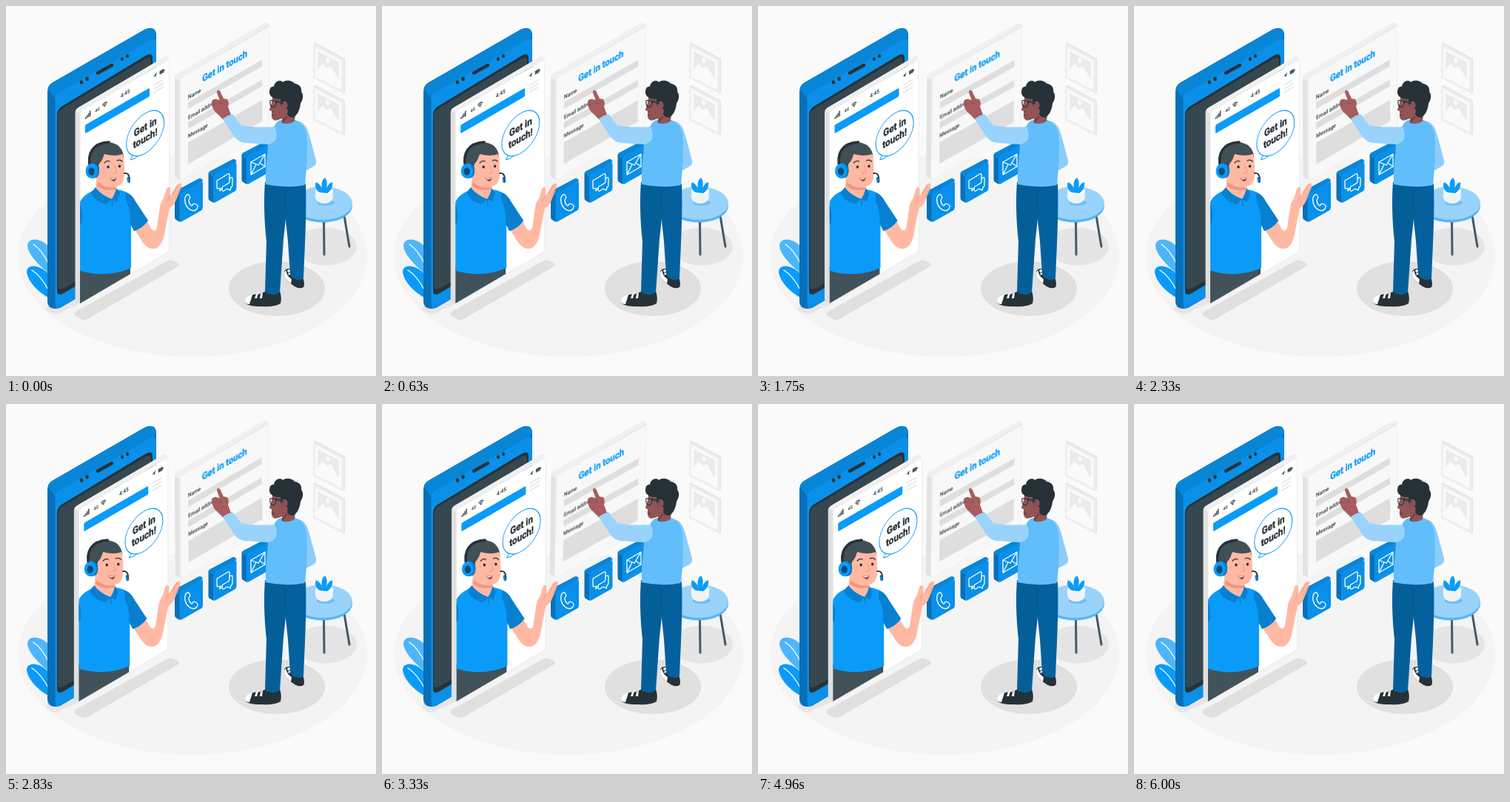
Recreate the animation shown at these times as an HTML page. Size 500 by 500 pixels, loop 6040 ms.

```html
<!DOCTYPE html>
<html lang="en">
<head>
<meta charset="utf-8">
<title>Get in touch</title>
<style>
  html, body { margin: 0; width: 100%; height: 100%; overflow: hidden; background: #fafafa; }
  svg { display: block; width: 100%; height: 100%; }
  text { font-family: Roboto, "Liberation Sans", sans-serif; font-weight: 500; fill: #263238; }
  .bold { font-weight: 700; stroke: #263238; stroke-width: .35; }
  .bold.blue { stroke: #0a9bf8; }
  .mid { text-anchor: middle; }
  .blue { fill: #0a9bf8; }
  .front { fill: #0a90e9; }
  .edge { fill: #0985d6; }
  .deep { fill: #0880cf; }
  .side { fill: #0870b8; }
  .light { fill: #99d3fc; }
  .ink { fill: #263238; }
  .slate { fill: #37474f; }
  .skin { fill: #ffb9a3; }
  .brown { fill: #8f5555; }
  .line { fill: none; stroke-linecap: round; stroke-linejoin: round; }
  .white { stroke: #fff; stroke-width: 1.3; }
  .dark { stroke: #263238; }

  #screen { animation: shake 6040ms linear infinite; }
  #form { animation: sway 6040ms linear infinite; transform-origin: 291.5px 129px; }

  /* Both cycles last 6 s, followed by a 40 ms rest. */
  @keyframes shake {
    0%, 99.338%, 100% { transform: translateX(0); }
    9.934%, 89.404% { transform: translateX(-1px); }
    19.868%, 79.47% { transform: translateX(2px); }
    29.801%, 49.669%, 69.536% { transform: translateX(-4px); }
    39.735%, 59.603% { transform: translateX(4px); }
  }
  @keyframes sway {
    0%, 99.338%, 100% { transform: rotate(0deg); }
    6.209%, 31.043%, 55.878%, 80.712% { transform: rotate(1deg); }
    18.626%, 43.46%, 68.295%, 93.129% { transform: rotate(-1deg); }
  }
</style>
</head>
<body>
<svg viewBox="0 0 500 500" xmlns="http://www.w3.org/2000/svg">
  <defs>
    <clipPath id="panel"><path d="M100 0H300V285L100 402Z"/></clipPath>
    <g id="picture">
      <path d="M0 0L3 -1.500L43 20V65.500L41 67L0 46Z" fill="#e6e6e6"/>
      <path d="M0 0L41 21.500V66.500L0 45.500Z" fill="#f0f0f0"/>
      <path d="M3 4.500L38 23V62L3 44Z" fill="#fafafa"/>
      <path d="M6 10L35 25V56L6 41Z" fill="#ebebeb"/>
      <path d="M6 41V35L13 26L18 33L24 30L35 49V56Z" fill="#fafafa"/>
      <ellipse cx="20" cy="23" rx="2.500" ry="3.200" fill="#fafafa"/>
    </g>
    <g id="key">
      <path class="side" d="M0 12Q0 9.500 2 8.500L32 -7Q36 -8.500 38 -5L7 17V51L2 48Q0 47 0 44Z"/>
      <path class="edge" d="M0 12Q0 9.500 2 8.500L33 -8Q36 -9 38 -5L8 13Q6 14 6 16Z"/>
      <path class="front" d="M6.500 16Q6.500 13.500 9 12L35 -3Q38 -5 38 -1V31Q38 34 35.500 35.500L10 50Q6.500 52 6.500 48Z"/>
    </g>
  </defs>

  <rect width="500" height="500" fill="#fafafa"/>
  <ellipse cx="252" cy="338" rx="236" ry="136" fill="#f4f4f4"/>

  <use href="#picture" x="415" y="51"/>
  <use href="#picture" x="415" y="108"/>

  <!-- Ground shadows -->
  <g fill="#e0e0e0">
    <path d="M55 411Q53 408 57 406L100 385V402L72 415Q66 418 62 415Z" fill="#e6e6e6"/>
    <path d="M94 419Q90 415 96 412L217 345Q222 342 226 344L232 347Q236 350 231 353L112 422Q106 426 101 423Z"/>
    <ellipse cx="366" cy="382" rx="65" ry="37"/>
    <ellipse cx="432" cy="325" rx="42" ry="25.500" fill="#e5e5e5"/>
  </g>

  <!-- Leaves -->
  <path d="M62 366C52 356 30 339 29 324C30 311 50 313 62 330Z" fill="#4fb5fa"/>
  <path class="blue" d="M62 396C46 390 28 372 28 358C30 347 50 350 62 368Z"/>
  <path class="line white" d="M37 322Q48 329 58 349M35 357Q47 364 58 385" stroke-width="1"/>

  <!-- Phone body -->
  <path class="side" d="M56 116Q56 108 62 104L187 32Q203 25 203 40V332L73 408Q56 412 56 399Z"/>
  <path class="edge" d="M57 112Q57 107 62 104L187 32Q200 26 203 38L196 50L72 122L66 125Z"/>
  <path class="front" d="M66.500 127Q66.500 120 72 117L195 46Q203 42 203 49V332L74 407Q66.500 411 66.500 402Z"/>
  <path class="ink" d="M69 148Q69 140 75 136L189 67Q198 62 198 71V318L78 388Q69 393 69 385Z"/>
  <path class="slate" d="M70 150Q70 142 76 138.500L188 71.500Q196 67 196 75V314L79 381Q70 386 70 379Z"/>
  <g class="ink">
    <path class="line dark" d="M124 90.500L143 80" stroke-width="4.500"/>
    <ellipse cx="102" cy="103" rx="2.200" ry="2.700"/>
    <ellipse cx="109.500" cy="98.500" rx="2.200" ry="2.700"/>
    <ellipse cx="157" cy="71.500" rx="2" ry="2.500"/>
    <ellipse cx="164" cy="67.500" rx="2" ry="2.500"/>
  </g>

  <!-- Contact form -->
  <g id="form">
    <path d="M228 97Q228 94 231 92L348 24Q351 22 354 24L356 27L236 101V235L230 232Q228 231 228 228Z" fill="#e3e3e3"/>
    <path d="M228 97Q228 94 231 92L348 24Q351 22 355 26L236 97L234.500 101Z" fill="#f0f0f0"/>
    <path d="M235 101Q235 98 238 96L352 29.500Q355.500 28 355.500 31V164Q355 167 353 168.500L239 234Q235 236 235 232Z" fill="#f8f8f8" stroke="#ececec" stroke-width=".7"/>
    <g transform="matrix(1 -.577 0 1 235 98)" fill="#dedede">
      <rect x="11" y="38.500" width="100" height="9"/>
      <rect x="11" y="65.500" width="100" height="9"/>
      <rect x="11" y="93" width="100" height="29"/>
    </g>
    <g transform="matrix(.866 -.5 0 1 235 98)" font-size="7.500">
      <text class="bold blue mid" x="70" y="22.500" font-size="13">Get in touch</text>
      <text x="12.800" y="34.500">Name</text>
      <text x="12.800" y="62">Email address</text>
      <text x="12.800" y="87">Message</text>
    </g>
  </g>

  <!-- Contact buttons -->
  <use href="#key" x="228" y="241"/>
  <use href="#key" x="273.500" y="215"/>
  <use href="#key" x="318.500" y="190"/>
  <g class="line white">
    <path d="M242 259C241 263 242 269 246 273C250 277 255 278 258 274C260 271 259 269 257 268L254 267L251 270C248 268 247 265 247 262L249 259L247 255C245 254 243 256 242 259Z"/>
    <path d="M285 236L300 227Q302 226 302 228V237Q302 239 300 240L293 244L289 250V246L286 247Q285 247 285 245Z"/>
    <path d="M302 233L304 232Q306 231 306 233V242Q306 244 304 245L303 249L299 247L294 250Q292 251 292 247V246"/>
    <path d="M331 211L350 200V217L331 228ZM331 211L341 215L350 200M331 228L338 214M350 217L343 212"/>
  </g>

  <!-- Side table -->
  <g>
    <path class="line" d="M429.500 288L430 336M457 283L464 325" stroke="#455a64" stroke-width="3"/>
    <path d="M388 267V270A40 22.500 0 0 0 468 270V267Z" fill="#55b5fa"/>
    <ellipse class="light" cx="428" cy="266.500" rx="40" ry="22.500"/>
    <ellipse cx="432" cy="266" rx="12" ry="4" fill="#6dc0fb"/>
    <path d="M418 250V258C419 270 441 270 442 258V250Z" fill="#f3f3f3"/>
    <ellipse cx="430" cy="250" rx="12" ry="4.200" fill="#fff"/>
    <path class="blue" d="M424 252C418 249 417 242 419 238C425 241 427 246 428 249C425 241 427 235 431 232C435 237 434 244 432 249C434 243 437 239 441 238C442 245 438 251 434 253Z"/>
  </g>

  <!-- Visitor -->
  <g>
    <path class="ink" d="M376 359C377 355 382 354 386 356L402 369Q404 377 402 380Q397 383 390 379C384 375 376 368 376 359Z"/>
    <path d="M376 360C376 366 380 371 385 375L386 369Q380 366 378 357ZM380 357L386 355L388 361L382 364Z" fill="#fff"/>
    <path class="line dark" d="M381 361L387 358M383 364L389 361" stroke-width="1"/>
    <path class="ink" d="M323 400C324 392 335 389 343 389L352 385H370Q373 394 371 402Q364 407 345 406Q325 406 323 400Z"/>
    <path d="M323 400C323 394 328 391 333 390Q331 397 329 403Q324 403 323 400ZM338 389L341 388L339 395H336ZM344 389L347 387L346 395H343Z" fill="#fff"/>

    <path d="M375 238L405 240C406 270 405 299 404 321L402 368Q392 374 384 363L381 318L375 262Z" fill="#04619e"/>
    <path d="M350 238H382C380 264 378 290 375 315L370 387Q361 393 350 387L352 318C349 290 348 263 350 238Z" fill="#045f99"/>
    <path class="line" d="M376 248L378 276" stroke="#034f80" stroke-width="1"/>

    <path d="M391 155C403 156 407 163 411 179L419 209Q420 214 415 217L401 225L400 211L407 207L399 187Z" fill="#8accfc"/>
    <path d="M371 154C367 155 365 158 362 163L354 187C353 206 350 223 351 241Q378 247 404 242C406 222 408 198 406 174C404 162 398 156 388 153Z" fill="#62bdfb"/>
    <path class="light" d="M363 163C347 164 330 164 318 161L306 146Q297 148 293 153L309 177Q314 184 324 185L354 187Q361 186 365 180Q367 171 363 163Z"/>

    <path d="M293 153L286 146Q279 141 278 132C277 127 281 125 285 126L289 128L285 117Q285 113 288 114Q290 115 291 119L294 125L299 126Q302 130 300 136L304 147Q298 148 293 153Z" fill="#a65d5f"/>
    <path class="line" d="M288 127L291 134M280 133L285 132" stroke="#874b4e" stroke-width=".9"/>

    <g transform="translate(1 .7)">
      <path class="brown" d="M360 117L358 130L355 139Q355 141 358 141L358 149Q359 154 364 154L373 151L371 157Q380 161 389 155L391 137L385 117Z"/>
      <path d="M372 152Q377 150 380 145Q379 153 372 157Z" fill="#7b4347"/>
      <path class="ink" d="M355 116C355 110 357 108 361 108C362 101 369 98 373 102C379 98 387 101 389 104C396 105 399 110 398 115C402 120 400 127 397 131C396 142 391 148 387 150Q380 150 379 145L380 139L374 138Q369 134 370 125C362 126 355 122 355 116Z"/>
      <ellipse class="brown" cx="375.500" cy="133.500" rx="4" ry="5.500"/>
      <path class="line" d="M374 131Q378 132 375 137" stroke="#7b4347" stroke-width=".8"/>
      <path class="line dark" d="M359 127L369 128M356 127Q355 134 359 136Q364 135 364 130Q363 126 356 127M364 129L374 131" stroke-width="1.100"/>
      <path class="line" d="M358 147L362 147" stroke="#6c3438" stroke-width="1"/>
    </g>
  </g>

  <!-- Phone screen with the agent -->
  <g id="screen">
    <path d="M93.500 144Q93.500 140 97 138L214 69Q218 67 220 71L101 147V402L96 400Q93.500 399 93.500 396Z" fill="#e0e0e0"/>
    <path d="M94.500 141Q95 139 98 137L214 69Q218 67 220 72L102 142L100 146Z" fill="#f0f0f0"/>
    <path d="M100 146Q100 143 103 141L217 74.500Q220.500 73 220.500 76V328Q220 331 218 333L104 400.500Q100 403 100 399Z" fill="#fff" stroke="#e6e6e6" stroke-width=".7"/>

    <g transform="matrix(1 -.577 0 1 99 142)">
      <g class="ink">
        <path d="M8 13H9.300V15.500H8ZM10 11.500H11.300V15.500H10ZM12 10H13.300V15.500H12ZM14 8H15.300V15.500H14Z"/>
        <path d="M33 12.500L34.500 14.500L36 12.500Q34.500 11.500 33 12.500Z"/>
        <path class="line dark" d="M31.500 10Q34.500 7 37.500 10M32.500 11.500Q34.500 9.700 36.500 11.500" stroke-width="1"/>
        <path d="M100 11.500L105 8L103 14L102.500 11.500Z"/>
        <rect x="108.500" y="8.500" width="6" height="5" rx=".8" fill="#455a64"/>
        <rect x="114.500" y="10" width="1" height="2"/>
      </g>
      <rect class="blue" x="8" y="23.500" width="87" height="11.500" rx="1.500"/>
      <path class="line" d="M101 23H113M101 28H113M101 33H113" stroke="#e0e0e0" stroke-width="1.400"/>
    </g>
    <g transform="matrix(.866 -.5 0 1 100 142)">
      <text x="23.500" y="14" font-size="6">4G</text>
      <text class="mid" x="70.500" y="14" font-size="7.500">4:45</text>
    </g>

    <g transform="translate(-.8 0)">
      <path d="M171 197Q173 203 169 208Q176 207 181 201" fill="#fff" stroke="#0a9bf8"/>
      <ellipse transform="matrix(1 -.577 0 1 189 172)" rx="25.500" ry="27" fill="#fff" stroke="#0a9bf8"/>
      <path d="M171.800 196L172.500 201L180 201L178 197Z" fill="#fff"/>
      <g class="mid" transform="matrix(.866 -.5 0 1 189 172)" font-size="13.500">
        <text class="bold" y="-4">Get in</text>
        <text class="bold" y="11.500">touch!</text>
      </g>
    </g>

    <g clip-path="url(#panel)">
      <path d="M98 352H168V366L98 406Z" fill="#41525b"/>
      <path class="skin" d="M171 298L190 290L197 302Q202 306 204 299L208 272Q209 265 213 260L217 247Q220 243 222 246L222 257L230 243Q234 238 237 240Q238 243 236 247L230 262Q227 270 221 273L213 313Q208 328 199 328Q190 328 184 318Z"/>
      <path class="line" d="M221 256L218 264M236 246L229 258M233 242L226 254" stroke="#f0957e" stroke-width=".9"/>
      <path class="blue" d="M98 270C101 259 109 253 119 249L150 248C163 250 169 254 174 263L192 290Q185 300 173 304L169 296V354Q135 369 98 357Z"/>
      <path class="deep" d="M162 252Q170 254 175 264L192 290Q185 300 173 304L168 294Q169 276 162 263Z"/>
      <path class="deep" d="M100 268Q105 279 102 294H98Z"/>
      <path class="skin" d="M123 226L121 246Q130 256 143 261L150 249L149 236Z"/>
      <path d="M124 238Q134 247 148 245L148 248Q132 251 123 243Z" fill="#f0957e"/>
      <path class="deep" d="M121 245Q127 255 143 261L136 268Q119 264 115 252ZM149 246L154 253L150 265L143 261Q147 255 149 246Z"/>
      <path class="line" d="M143 261L144 270" stroke="#0870b6" stroke-width="1"/>
    </g>

    <!-- Head -->
    <path d="M115 226C108 211 112 189 131 185C147 182 158 190 159 204L154 214L128 226Z" fill="#414f56"/>
    <path class="skin" d="M126 213C131 208 131 204 133 200Q147 204 158 200C160 208 160 218 160 227C160 238 155 244 147 244C136 244 125 239 121 231Z"/>
    <path class="line dark" d="M114 219C109 200 117 185 139 184" stroke-width="3.500"/>
    <ellipse class="ink" cx="121" cy="222" rx="5" ry="10"/>
    <ellipse class="deep" cx="118" cy="222.500" rx="8" ry="10.500"/>
    <ellipse class="blue" cx="115.500" cy="223" rx="8" ry="10"/>
    <ellipse cx="115.500" cy="223.500" rx="4.200" ry="5.200" fill="#0b4c7c"/>
    <ellipse class="ink" cx="138" cy="217.500" rx="1.700" ry="2.100"/>
    <ellipse class="ink" cx="153.500" cy="216.500" rx="1.700" ry="2.100"/>
    <path class="line dark" d="M133 212Q136 208 140 210M150 209Q154 207 157 210" stroke-width="1.300"/>
    <path class="line" d="M147 216L150 225L145 226" stroke="#f0957e" stroke-width="1"/>
    <path d="M140 232Q145 234 149 231Q149 237 145 237Q142 236 140 232Z" fill="#a63b3b"/>
    <path d="M141 232.500Q145 234 148.500 231.500L148 233Q145 235 142 234Z" fill="#fff"/>
    <path class="line dark" d="M160 226Q166 225 167 233" stroke-width="1.800"/>
    <path class="line" d="M165.500 233L166 237" stroke="#0b5f9c" stroke-width="4"/>
    <path class="line" d="M164.800 234.500L165 237" stroke="#0a9bf8" stroke-width="2"/>
  </g>
</svg>
</body>
</html>
```
